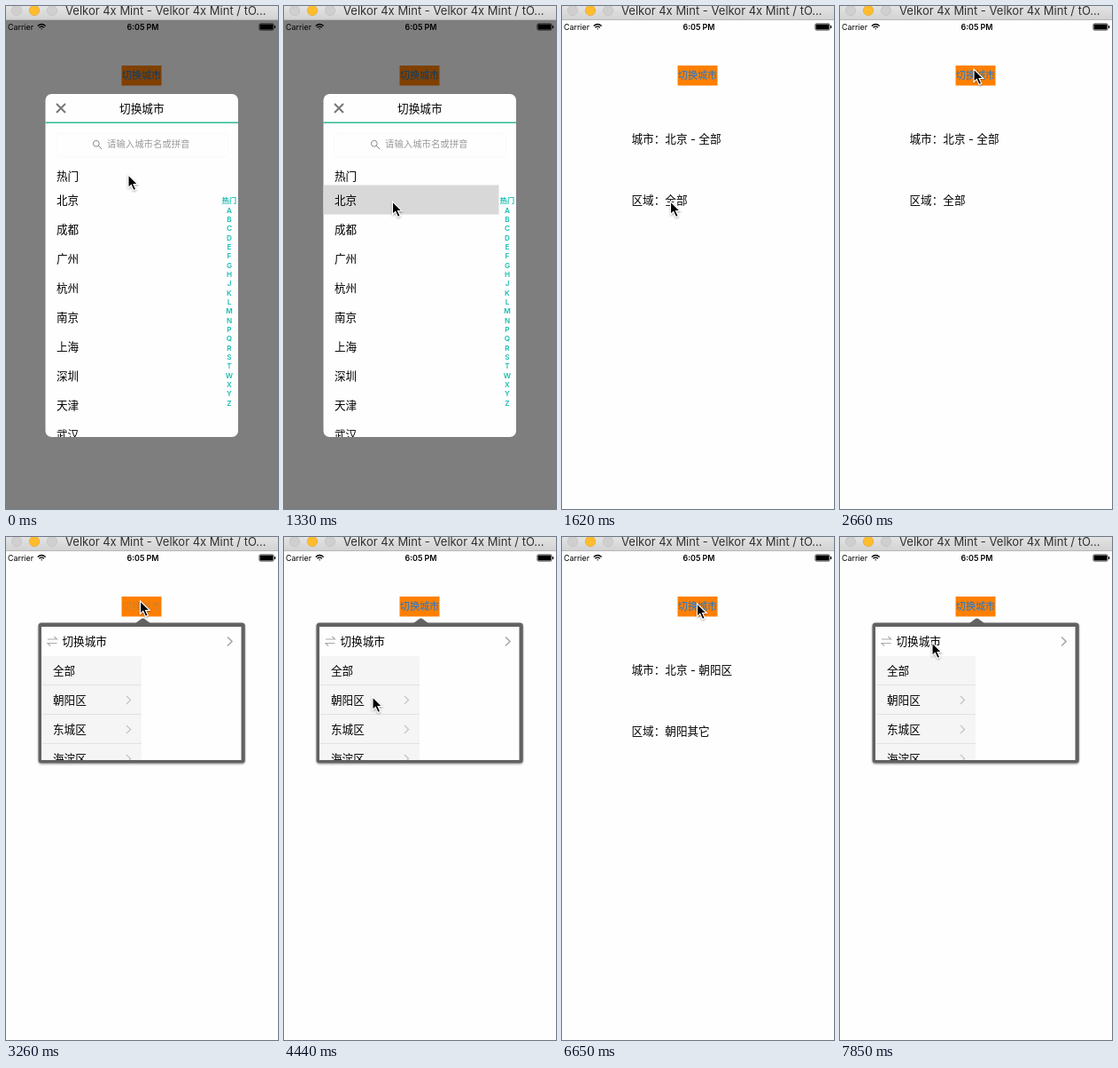
An HTML page for the animation above (8000 ms loop, 307x566 px).

```html
<!DOCTYPE html>
<html lang="zh-CN">
<head>
<meta charset="utf-8">
<title>City picker</title>
<style>
  html, body { margin: 0; width: 100%; height: 100%; overflow: hidden; background: #fff; }
  svg { display: block; width: 307px; height: 566px; }
  text { font-family: Inter, "Noto Sans CJK SC", "Noto Sans CJK", sans-serif; }
</style>
</head>
<body>
<svg id="stage" viewBox="0 0 307 566">
  <defs>
    <linearGradient id="barFill" x2="0" y2="1">
      <stop stop-color="#e4e3e4"/><stop offset="1" stop-color="#d3d2d3"/>
    </linearGradient>
    <clipPath id="modalClip"><rect x="44.5" y="99" width="217.5" height="386" rx="7"/></clipPath>
    <clipPath id="popupClip"><rect x="40" y="101" width="225.5" height="150"/></clipPath>
    <filter id="soft" x="-20%" y="-20%" width="140%" height="140%">
      <feDropShadow dx="0" dy="1" stdDeviation="1" flood-opacity=".4"/>
    </filter>
  </defs>

  <g id="page">
    <rect y="16" width="307" height="550" fill="#fefefe"/>
    <g fill="none" stroke="#000" stroke-width="1.2">
      <path d="M35.7 22.5q4.5-4 9 0M37.4 24.3q2.8-2.4 5.6 0"/>
      <circle cx="40.2" cy="25.8" r=".7" fill="#000" stroke="none"/>
    </g>
    <rect x="285.8" y="19.8" width="16.4" height="7.4" rx="1.5" fill="none" stroke="#000" stroke-width=".6"/>
    <rect x="286.5" y="20.5" width="15" height="6" rx=".8"/>
    <rect x="303" y="22" width="1.2" height="3" rx=".5"/>
    <rect x="130.5" y="67" width="45" height="22.5" fill="#ff8000"/>
  </g>

  <g id="popup">
    <g fill="#626262" filter="url(#soft)">
      <path d="M145.5 97.5l7.5-5.500q1.500-1 3 0l7.500 5.500z"/>
      <rect x="36.500" y="96.500" width="233.300" height="158" rx="3.500"/>
    </g>
    <g id="popupBody" clip-path="url(#popupClip)">
      <rect x="40" y="101" width="226" height="150" fill="#fefefe"/>
      <path d="M47 115h10.500l-3-3M57.500 119.500H47l3 3" fill="none" stroke="#aaa" stroke-width="1.1"/>
      <path d="M250 112.500l5 5-5 5" fill="none" stroke="#aaa" stroke-width="1.6"/>
      <rect x="40" y="134" width="113" height="117" fill="#f5f5f5"/>
      <g id="districts">
        <rect x="40" y="167" width="113.500" height="33" fill="#ebebeb"/>
        <rect x="153.500" y="134" width="113" height="118" fill="#ebebeb"/>
      </g>
    </g>
  </g>

  <g id="modal">
    <rect y="16" width="307" height="550" opacity=".5"/>
    <g id="modalBody" clip-path="url(#modalClip)">
      <rect x="44" y="99" width="219" height="387" fill="#fefefe"/>
      <path d="M57 110l10 10m0-10l-10 10" stroke="#777" stroke-width="2"/>
      <rect x="44" y="130.500" width="219" height="1.500" fill="#2fb795"/>
      <rect x="56.500" y="143.500" width="194" height="26" rx="4" fill="none" stroke="#f9f9f9"/>
      <g fill="none" stroke="#888"><circle cx="101.800" cy="154.800" r="3.400"/><path d="M104.300 157.300l3.700 3.700"/></g>
      <rect id="chosenCity" x="44" y="201.500" width="198.500" height="33" fill="#d8d8d8"/>
    </g>
  </g>

  <g id="titleBar">
    <rect width="307" height="15.500" fill="url(#barFill)"/>
    <rect y="15" width="307" height="1" fill="#b8b7b8"/>
    <g fill="#d0cfd0" stroke="#bdbcbd" stroke-width=".6">
      <circle cx="12" cy="5" r="5.700"/>
      <circle cx="32" cy="5" r="5.700" fill="#ffbd2e" stroke="#e0a028"/>
      <circle cx="52" cy="5" r="5.700"/>
    </g>
  </g>

  <path id="cursor" d="M0 0v14.500l3.300-3.100 2.700 6.100 2.700-1.200-2.700-5.800h4.700z" stroke="#fff" stroke-width="1.100" filter="url(#soft)"/>
</svg>
<script>
const LOOP = 8000, TICK = 148, ROW = 33, BODY = 12.6;
const el = id => document.getElementById(id);

function add(parent, tag, attrs) {
  const node = document.createElementNS(el("stage").namespaceURI, tag);
  for (const key in attrs) node.setAttribute(key, attrs[key]);
  return parent.appendChild(node);
}

// y is the visual middle of the line.
function label(parent, x, y, words, size = BODY, attrs = {}) {
  const node = add(parent, "text", { x, y: y + size * .36, "font-size": size, ...attrs });
  node.textContent = words;
  return node;
}

const centred = { "text-anchor": "middle" };

label(el("titleBar"), 67, 5, "Velkor 4x Mint - Velkor 4x Mint / tO...", 13, { fill: "#303030" });

const page = el("page");
label(page, 2, 23.5, "Carrier", 8.9);
label(page, 154.5, 23.5, "6:05 PM", 8.9, { ...centred, "font-weight": 600 });
const buttonText = label(page, 153, 78.5, "切换城市", 11.1, { ...centred, fill: "#1878d8" });
const cityText = label(page, 78.5, 149.5, "");
const areaText = label(page, 78.5, 218, "");

const modal = el("modalBody");
label(modal, 153.3, 115.5, "切换城市", BODY, centred);
label(modal, 114, 155.5, "请输入城市名或拼音", 10.4, { fill: "#999" });
label(modal, 57, 191.5, "热门");
["北京", "成都", "广州", "杭州", "南京", "上海", "深圳", "天津", "武汉"]
  .forEach((city, i) => label(modal, 57, 218 + ROW * i, city));
["热门", ..."ABCDEFGHJKLMNPQRSTWXYZ"].forEach((key, i) =>
  label(modal, 252, 219.5 + 10.33 * i, key, 8.2, { ...centred, fill: "#18bdb0", "font-weight": 600 }));

const popup = el("popupBody"), districts = el("districts");

function column(parent, left, names, hasChevrons) {
  names.forEach((name, i) => {
    const top = 134 + ROW * i;
    label(parent, left + 12, top + 16.5, name);
    add(parent, "rect", { x: left, y: top + 32, width: 112, height: 1, fill: "#e2e2e2" });
    if (hasChevrons && i > 0)
      add(popup, "path", { d: `M136 ${top + 12}l4.5 4.5-4.5 4.5`, fill: "none", stroke: "#c4c4c4", "stroke-width": 1.3 });
  });
}

label(popup, 63.5, 117.5, "切换城市");
column(popup, 41, ["全部", "朝阳区", "东城区", "海淀区"], true);
column(districts, 153.5, ["全部", "朝阳其它", "安贞", "劲松/潘家园"], false);

// The pointer rests between these moves; times are in ticks.
const home = { x: 138, y: 190 };
const moves = [
  { from: 0, to: 4, x: 120, y: 225 },
  { from: 5, to: 7, x: 122.5, y: 220 },
  { from: 13, to: 16, x: 150.5, y: 70 },
  { from: 17, to: 19, x: 151.5, y: 72 },
  { from: 23, to: 30, x: 100, y: 180 },
  { from: 32, to: 36, x: 184, y: 183 },
  { from: 41, to: 45, x: 152.5, y: 75 },
  { from: 47, to: 53, x: 104, y: 119 }
];

function pointerAt(tick) {
  let { x, y } = home;
  for (const move of moves) {
    const p = Math.min(1, Math.max(0, (tick - move.from) / (move.to - move.from)));
    const eased = p * p * (3 - 2 * p);
    x += (move.x - x) * eased;
    y += (move.y - y) * eased;
  }
  return `translate(${x} ${y})`;
}

const show = (node, on) => node.setAttribute("visibility", on ? "visible" : "hidden");

function render(now) {
  const tick = Math.floor((now % LOOP + 18) / TICK);
  const within = (from, to) => tick >= from && tick < to;
  el("cursor").setAttribute("transform", pointerAt(tick));

  show(el("modal"), tick < 11);
  el("modal").setAttribute("opacity", tick < 10 ? 1 : .45);
  show(el("chosenCity"), within(9, 11));

  show(el("popup"), within(22, 39) || tick >= 47);
  show(districts, within(32, 39));
  buttonText.setAttribute("opacity", tick === 22 || tick === 47 ? .2 : 1);

  const picked = tick >= 39;
  cityText.textContent = "城市：北京 - " + (picked ? "朝阳区" : "全部");
  areaText.textContent = "区域：" + (picked ? "朝阳其它" : "全部");
}

function animate() {
  render(performance.now());
  requestAnimationFrame(animate);
}
animate();
</script>
</body>
</html>
```
